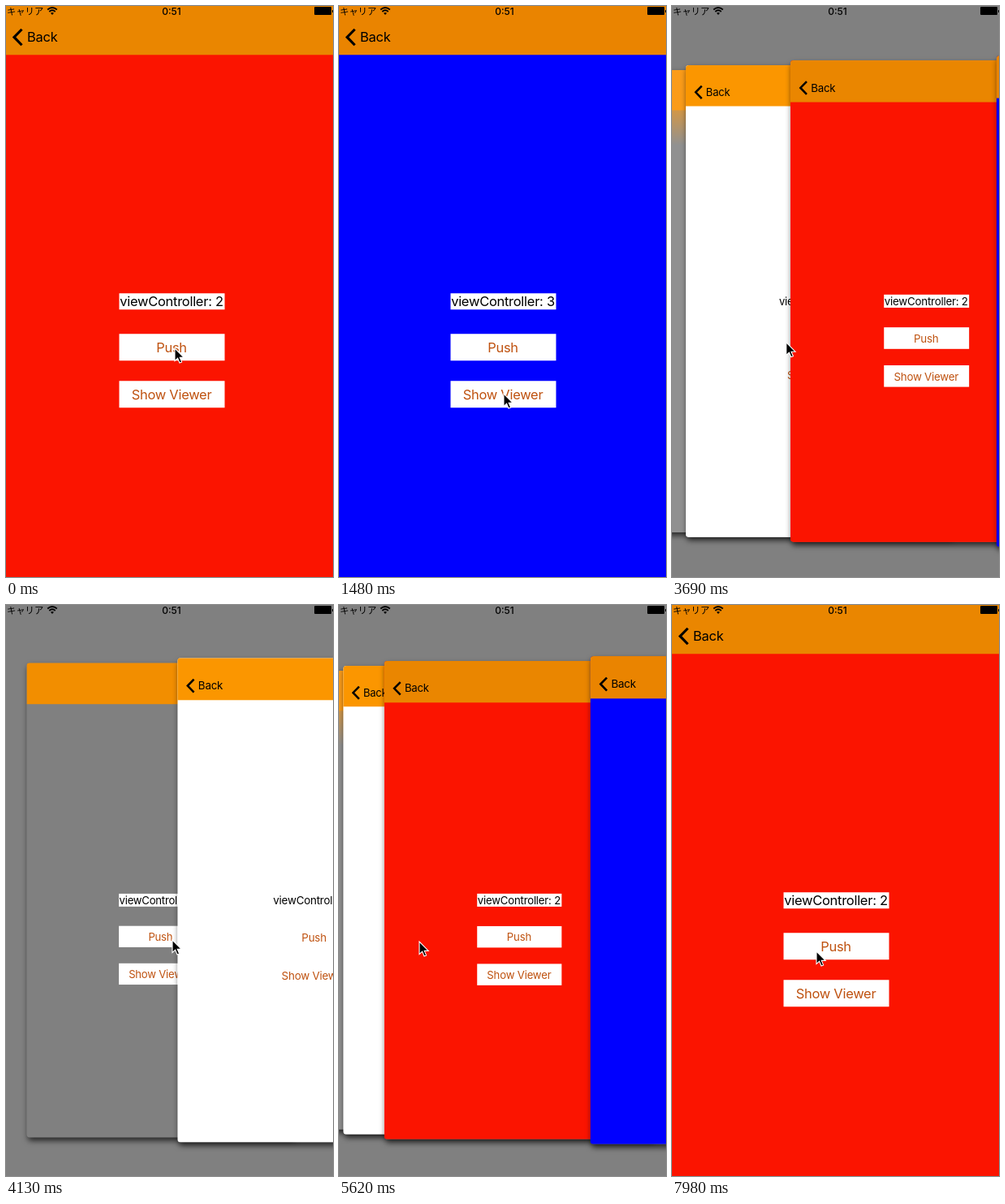
Animation, 403 px wide and 704 px high, one loop 8 s. Source, as an HTML page:

```html
<!DOCTYPE html>
<html lang="en">
<head>
<meta charset="utf-8">
<title>Navigation stack viewer</title>
<style>
html, body { margin: 0; width: 100%; height: 100%; overflow: hidden; }
#stage {
  position: relative; width: 403px; height: 704px; overflow: hidden;
  background: #808080; color: #000;
  font: 16.5px Inter, Roboto, sans-serif; letter-spacing: -.28px;
}
#stage div, #stage svg { position: absolute; }
.card {
  left: 0; top: 0; width: 414px; height: 736px;
  transform-origin: 0 0; border-radius: 5px; overflow: hidden;
  box-shadow: 2px 5px 9px rgba(0, 0, 0, .7);
}
.body { inset: 0; background: var(--fill); }
.nav { left: 0; top: 0; width: 100%; height: 63.75px; background: var(--bar); }
.back { left: 31.5px; top: 31.5px; line-height: 20px; }
.chevron { left: 13px; top: 31px; }
.items { left: 5.5px; top: 3.75px; }
.items div { left: 137px; width: 130px; background: #fff; text-align: center; white-space: nowrap; }
.label { top: 354px; height: 20px; line-height: 21px; }
.items .button { height: 33px; line-height: 34px; color: #bf5210; }
.veil {
  inset: 0;
  background: linear-gradient(rgba(255, 155, 20, .6) 63px, rgba(255, 155, 20, 0) 120px),
    rgba(255, 255, 255, .13);
}
.carrier { left: 1px; top: 0; font: 300 11.3px/13px "Noto Sans CJK JP", "Noto Sans CJK", sans-serif; letter-spacing: 0; white-space: nowrap; }
.clock { left: 174px; width: 60px; top: 0; text-align: center; font-size: 12px; font-weight: 500; line-height: 14px; letter-spacing: 0; }
.battery { left: 380px; top: 1px; width: 21px; height: 10px; border-radius: 1px; background: #000; }
.nub { left: 402px; top: 5px; width: 1px; height: 3px; background: #000; }
.wifi { left: 50px; top: 0; }
#cursor { left: 0; top: 0; }
</style>
</head>
<body>
<div id="stage">
  <div id="cards"></div>
  <div class="carrier">キャリア</div>
  <svg class="wifi" width="14" height="12" fill="none" stroke="#000" stroke-width="1.9">
    <path d="M1.2 4.4Q7 -.4 12.8 4.4M3.3 6.9Q7 3.8 10.7 6.9"/>
    <path d="M7 11L5 8.8Q7 7.2 9 8.8Z" fill="#000" stroke="none"/>
  </svg>
  <div class="clock">0:51</div>
  <div class="battery"></div><div class="nub"></div>
  <svg id="cursor" width="15" height="22" viewBox="-1 -1 15 22">
    <path d="M0 0V15.6L3.6 12.3L6 18L8.6 16.9L6.2 11.4H11.2Z" fill="#000" stroke="#fff" stroke-width="1.1"/>
  </svg>
</div>
<script>
const STEP = 147.8, LOOP = 8000, WIDTH = 403;
const FULL = { x: -5.5, y: -3.75, s: 1 };

const mix = (a, b, p) => a + (b - a) * p;
const clamp = v => Math.min(1, Math.max(0, v));
const span = (k, from, to) => clamp((k - from) / (to - from));
const smooth = p => p * p * (3 - 2 * p);

// All motion is a function of the step k; the picture holds within a step.
const settle = k => Math.max(0, 2 - k);
const push = k => k < 10 ? Math.min(WIDTH, Math.max(2, WIDTH * .2 ** (k - 3.5))) : 0;
const fan = k => smooth(span(k, 15, 18)) - smooth(span(k, 50, 54));

function scroll(k) {
  if (k < 31) return 2 * smooth(span(k, 23, 29.65));
  return k < 41 ? Math.min(2, .567 * Math.exp(-.493 * (k - 34))) : 0;
}

function pointer(k) {
  let x = 208, y = 422;
  const move = (from, to, tx, ty) => {
    const p = span(k, from, to);
    x = mix(x, tx, p);
    y = mix(y, ty, p);
  };
  move(9, 10, 203, 478);   // to Show Viewer
  move(18, 23, 98, 416);
  move(23, 28, 205, 413);  // drag right
  move(31, 34, 124, 415);  // drag left
  move(34, 36, 99, 415);
  move(38, 41, 156, 291);
  move(42, 46, 341, 297);  // hover
  move(46, 49, 200, 285);
  move(50, 53, 178, 427);
  return [x, y];
}

function makeCard(index, fill, bar) {
  const el = document.createElement('div');
  el.className = 'card';
  el.style.setProperty('--fill', fill);
  el.style.setProperty('--bar', bar);
  const back = `<svg class="chevron" width="14" height="23" fill="none" stroke="#000" stroke-width="3.2">
    <path d="M12 1.5L2.5 11.2L12 21"/></svg><div class="back">Back</div>`;
  el.innerHTML = `<div class="body"><div class="items">
    <div class="label">viewController: ${index}</div>
    <div class="button" style="top:404px">Push</div>
    <div class="button" style="top:462px">Show Viewer</div></div></div>
    <div class="nav">${index ? back : ''}</div>${index ? '' : '<div class="veil"></div>'}`;
  document.getElementById('cards').append(el);
  const part = name => el.querySelector('.' + name);
  return { el, body: part('body'), items: part('items'), back: part('back'), veil: part('veil') };
}

const cards = [
  makeCard(0, 'transparent', '#f28e00'),
  makeCard(1, '#fff', '#fb9600'),
  makeCard(2, '#fb1400', '#ea8600'),
  makeCard(3, '#00f', '#ea8400')
];
const [root, , red, blue] = cards;
const cursor = document.getElementById('cursor');

// Place in the fanned stack; u = 0 is the resting front-left slot.
function slot(u) {
  return { x: 35.6 + u * (u < 0 ? 33 : 254), y: 69.5 - 6 * u, s: .8 + .0163 * u };
}

function place(card, a, b, p) {
  const v = key => mix(a[key], b[key], p);
  card.el.style.transform = `translate(${v('x')}px,${v('y')}px) scale(${v('s')})`;
}

const shift = (el, x) => { el.style.transform = `translateX(${x}px)`; };

function draw(time) {
  const k = Math.floor((time % LOOP + 9) / STEP);
  const s = scroll(k), open = fan(k), off = push(k);
  const inStack = k > 15, closing = k > 50;

  cards.forEach((card, i) => {
    const to = slot(s + i - 2);
    let p = 1;
    if (card === blue && !closing) p = open;
    if (card === red && (closing || !inStack)) p = open;
    if (card === blue && closing) to.x += 160 * (1 - open);
    place(card, FULL, to, p);
  });

  blue.el.style.visibility = k < 4 ? 'hidden' : 'visible';
  shift(blue.body, off);
  shift(blue.back, off * .4);
  blue.back.style.opacity = 1 - off / WIDTH;
  shift(red.body, inStack ? 0 : -.3 * (WIDTH - off));
  shift(red.items, settle(k));
  root.veil.style.opacity = clamp(1.55 - s);

  const [x, y] = pointer(k);
  cursor.style.transform = `translate(${x - 1}px,${y - 1}px)`;
}

const start = performance.now();
function tick(now) {
  draw(Math.max(0, now - start));
  requestAnimationFrame(tick);
}
draw(0);
requestAnimationFrame(tick);
</script>
</body>
</html>
```
